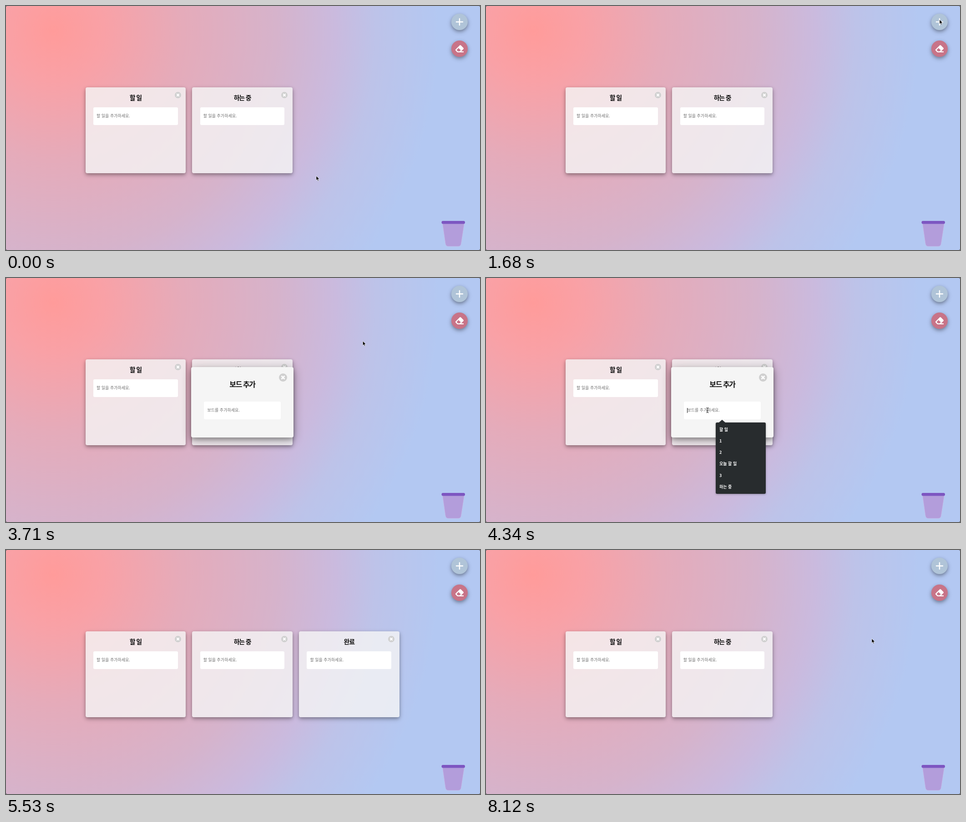
Write an HTML page that moves like this. It is 1042 px wide and 537 px high and loops after 8.68 s.

```html
<!DOCTYPE html>
<html lang="ko">
<head>
<meta charset="utf-8">
<title>Board</title>
<style>
  html, body { margin: 0; width: 100%; height: 100%; overflow: hidden; background: #55505c; }
  * { box-sizing: border-box; }
  #stage {
    position: absolute; inset: 0; overflow: hidden; border-radius: 3px;
    font: 9px/1 "Noto Sans CJK KR", "Noto Sans CJK", "Noto Sans", sans-serif;
    background: radial-gradient(circle 1055px at 104px 54px,
      #ff9b9a 0, #f9a1a6 111px, #e5abba 285px, #d6b3cb 490px, #cabade 620px, #bdc3e9 710px, #b3c8f2 850px);
    --shadow: 0 3px 6px rgba(0,0,0,.23), 0 4px 12px rgba(0,0,0,.2);
  }
  #stage div, #stage svg { position: absolute; }
  #stage svg { overflow: visible; }
  .card { top: 178.5px; width: 220.7px; height: 189px; border-radius: 4px;
    background: rgba(245,245,245,.8); box-shadow: var(--shadow); }
  .title { left: 0; width: 100%; top: 14px; text-align: center; color: #111;
    font-size: 14px; line-height: 17px; font-weight: 700; letter-spacing: -1.2px; }
  .field { left: 17.5px; top: 44.5px; width: 185.5px; height: 39px; padding-left: 7px;
    border-radius: 3px; background: #fff; color: #6e6e6e; line-height: 38px; white-space: pre; }
  .close { width: 14px; height: 14px; border-radius: 50%; background: #d0d0d0; }
  .close svg { inset: 0; width: 100%; height: 100%; stroke: #fff; stroke-width: 2.2; }
  .card .close { left: 196px; top: 10.5px; }
  .pressed { box-shadow: 0 0 0 1px #d0d0d0, 0 0 0 2.2px #111, 0 4px 10px 2px rgba(0,0,0,.3); transform: translateY(-1.5px); }
  .round { left: 979px; width: 36px; height: 36px; border-radius: 50%; box-shadow: var(--shadow); }
  #modal { left: 407px; top: 196px; width: 225px; height: 154.5px; border-radius: 4px; background: #f5f5f5;
    box-shadow: 0 5px 22px rgba(0,0,0,.33), 0 5px 8px rgba(0,0,0,.22); }
  #modal .title { top: 26.5px; font-size: 16px; line-height: 20px; letter-spacing: -1.4px; }
  #modal .close { left: 193px; top: 13.5px; width: 18px; height: 18px; }
  #modal .field { left: 28px; top: 76px; width: 169px; padding-left: 7.5px; }
  #caret { left: 442.3px; top: 286px; width: 1px; height: 11px; background: #222; }
  #typed { left: 442.5px; top: 286.5px; color: #111; white-space: pre; }
  #typed u { text-underline-offset: 1px; }
  #list { left: 505px; top: 318px; width: 109.5px; border-radius: 3px; background: #282c2e;
    padding: 3px 0; color: #fff; font-weight: 700; box-shadow: 0 1px 4px rgba(0,0,0,.3); }
  #list::before { content: ""; position: absolute; left: 7px; top: -6px;
    border: solid transparent; border-width: 0 7px 6px; border-bottom-color: #282c2e; }
  #list p { margin: 0; padding-left: 8px; line-height: 25.15px; }
</style>
</head>
<body>
<div id="stage">
  <div id="cards"></div>

  <div class="round" id="add" style="top:17px"></div>
  <svg width="1" height="1"><path d="M990 35H1004M997 28V42" stroke="#fff" stroke-width="2.4" stroke-linecap="round"/></svg>
  <div class="round" style="top:76px;background:#c87488"></div>
  <svg style="left:988px;top:85px" width="18" height="18" viewBox="0 0 512 512"><path fill="#fff" fill-rule="evenodd"
    d="M338 46a48 48 0 0 0-68 0L14 302a48 48 0 0 0 0 68l96 96q14 14 34 14H500q12 0 12-12v-40q0-12-12-12H356L498 274a48 48 0 0 0 0-68ZM195 211 333 349 265 416H151L71 336Z"/></svg>

  <svg width="1" height="1">
    <path d="M959.5 478H1007.5L1000.5 523Q999.5 529 994 529H972.500Q967 529 966 523Z" fill="#b39ddb" stroke="#c6b9e6" stroke-width=".8"/>
    <rect x="957.500" y="473" width="51.500" height="6.500" rx="3" fill="#7d56c1"/>
  </svg>

  <div id="modal"></div>
  <div id="typed"></div>
  <div id="caret"></div>
  <div id="list"></div>

  <svg id="cursor" width="1" height="1" stroke-linejoin="round">
    <path id="arrow" d="M0 0V9.600L2.200 7.600 3.700 11.200 5.300 10.500 3.800 7.100H6.900Z" fill="#000" stroke="#fff" stroke-width=".7"/>
    <path id="hand" d="M-2 1.200Q-2 0-1 0T0 1.200V5Q3.800 4.600 5 6.500V9.500Q5 13 3 13H-.5Q-1.500 12-4 8.500-4.600 7-3 7.200L-2 8.500Z" fill="#fff" stroke="#111" stroke-width=".9"/>
    <g id="beam" fill="none"><path d="M-2.500-5.500Q0-5.500 0-4Q0-5.500 2.500-5.500M0-4V4M-2.500 5.500Q0 5.500 0 4Q0 5.500 2.500 5.500M-1.500 1H1.500" stroke="#fff" stroke-width="2.200"/>
      <path d="M-2.500-5.500Q0-5.500 0-4Q0-5.500 2.500-5.500M0-4V4M-2.500 5.500Q0 5.500 0 4Q0 5.500 2.500 5.500M-1.500 1H1.500" stroke="#111"/></g>
  </svg>
</div>

<script>
const LOOP = 8680, TICK = 70;
const $ = id => document.getElementById(id);
const show = (el, on) => { el.style.visibility = on ? 'visible' : 'hidden'; };
const within = (t, from, to) => t >= from && t < to;
const ramp = (t, from, to) => Math.min(1, Math.max(0, (t - from) / (to - from)));
const ease = p => p * p * (3 - 2 * p);

const panel = (title, hint) => `<div class="title">${title}</div>
  <div class="close"><svg viewBox="0 0 14 14"><path d="M4.300 4.300 9.700 9.700M9.700 4.300 4.300 9.700"/></svg></div>
  <div class="field">${hint}</div>`;

$('cards').innerHTML = ['할 일', '하는 중', '완료'].map((title, i) =>
  `<div class="card" style="left:${174.5 + i * 234.7}px">${panel(title, '할 일을 추가하세요.')}</div>`).join('');
const doneCard = $('cards').lastElementChild;
const doneClose = doneCard.querySelector('.close');

const HINT = '보드를 추가하세요.';
$('modal').innerHTML = panel('보드 추가', HINT);
const modalField = $('modal').querySelector('.field');

const OPTIONS = ['할 일', '1', '2', '오늘 할 일', '3', '하는 중'];
// [time, committed text, syllable being composed]
const TYPING = [[4830, '', 'ㅇ'], [4970, '', '오'], [5110, '', '완'], [5250, '완', 'ㄹ'], [5390, '완', '료']];

// [time, x, y, eased]
const PATH = [
  [0, 682, 374], [280, 799, 227, 1], [490, 799, 227], [980, 963, 49, 1], [1190, 963, 49], [1680, 997, 30, 1],
  [2310, 997, 30], [3430, 997, 30], [4060, 487, 291, 1], [6440, 487, 291], [6510, 552, 228], [6580, 723, 129],
  [6720, 723, 129], [6930, 806, 187], [7070, 876, 222], [7140, 872, 210], [7280, 856, 199], [7420, 848, 195], [LOOP, 848, 195]
];

function cursorAt(t) {
  const i = PATH.findIndex(key => key[0] > t);
  const [t0, x0, y0] = PATH[i - 1], [t1, x1, y1, eased] = PATH[i];
  const raw = ramp(t, t0, t1), p = eased ? ease(raw) : raw;
  return [x0 + (x1 - x0) * p, y0 + (y1 - y0) * p];
}

function drawCursor(t) {
  const [x, y] = cursorAt(t);
  const hand = within(t, 2380, 3570) || within(t, 7560, 7980);
  const beam = within(t, 4060, 4830);
  const hidden = within(t, 4830, 6510);
  $('cursor').style.transform = `translate(${x + (hand ? 1 : 0)}px, ${y}px)`;
  show($('hand'), hand);
  show($('beam'), beam);
  show($('arrow'), !hand && !beam && !hidden);
}

function drawAddButton(t) {
  const hover = ramp(t, 2310, 2590) - ramp(t, 3430, 3710);
  const pressed = within(t, 3080, 3220);
  const style = $('add').style;
  style.transform = `translateY(${pressed ? -4 : 0}px) scale(${1 + .12 * hover})`;
  style.background = `color-mix(in srgb, #b3c8ee ${hover * 100}%, #b0c4d8)`;
  style.boxShadow = pressed
    ? '0 0 0 .5px #dfe6f2, 0 0 0 1.6px #111, 0 2px 0 1.4px #e4e9f2, 0 5px 9px 1px rgba(0,0,0,.4)'
    : 'var(--shadow)';
}

let listKey = '';
function drawList(t) {
  const filtered = t >= 4830;
  const items = filtered ? ['오늘 할 일'] : OPTIONS;
  if (listKey !== items.join()) {
    listKey = items.join();
    $('list').innerHTML = items.map(item => `<p>${item}</p>`).join('');
  }
  show($('list'), within(t, 4270, 4830) || within(t, 4970, 5250));
  $('list').style.opacity = t === 4270 || t === 4970 ? .6 : 1;
}

let typedKey = null;
function drawModal(t) {
  const open = within(t, 3220, 5530);
  show($('modal'), open);
  const step = open && TYPING.filter(key => key[0] <= t).pop();
  const text = step ? `${step[1]}<u>${step[2]}</u>` : '';
  if (text !== typedKey) {
    typedKey = text;
    $('typed').innerHTML = text;
    modalField.textContent = text ? '' : HINT;
    $('caret').style.left = 442.3 + $('typed').offsetWidth + 'px';
  }
  show($('caret'), within(t, 4060, 5530));
}

function render(ms) {
  const t = Math.floor((ms % LOOP) / TICK) * TICK;
  drawCursor(t);
  drawAddButton(t);
  drawModal(t);
  drawList(t);
  show(doneCard, within(t, 5530, 7980));
  doneClose.classList.toggle('pressed', within(t, 7840, 7980));
}

const start = performance.now();
function frame() {
  render(performance.now() - start);
  requestAnimationFrame(frame);
}
frame();
</script>
</body>
</html>
```
